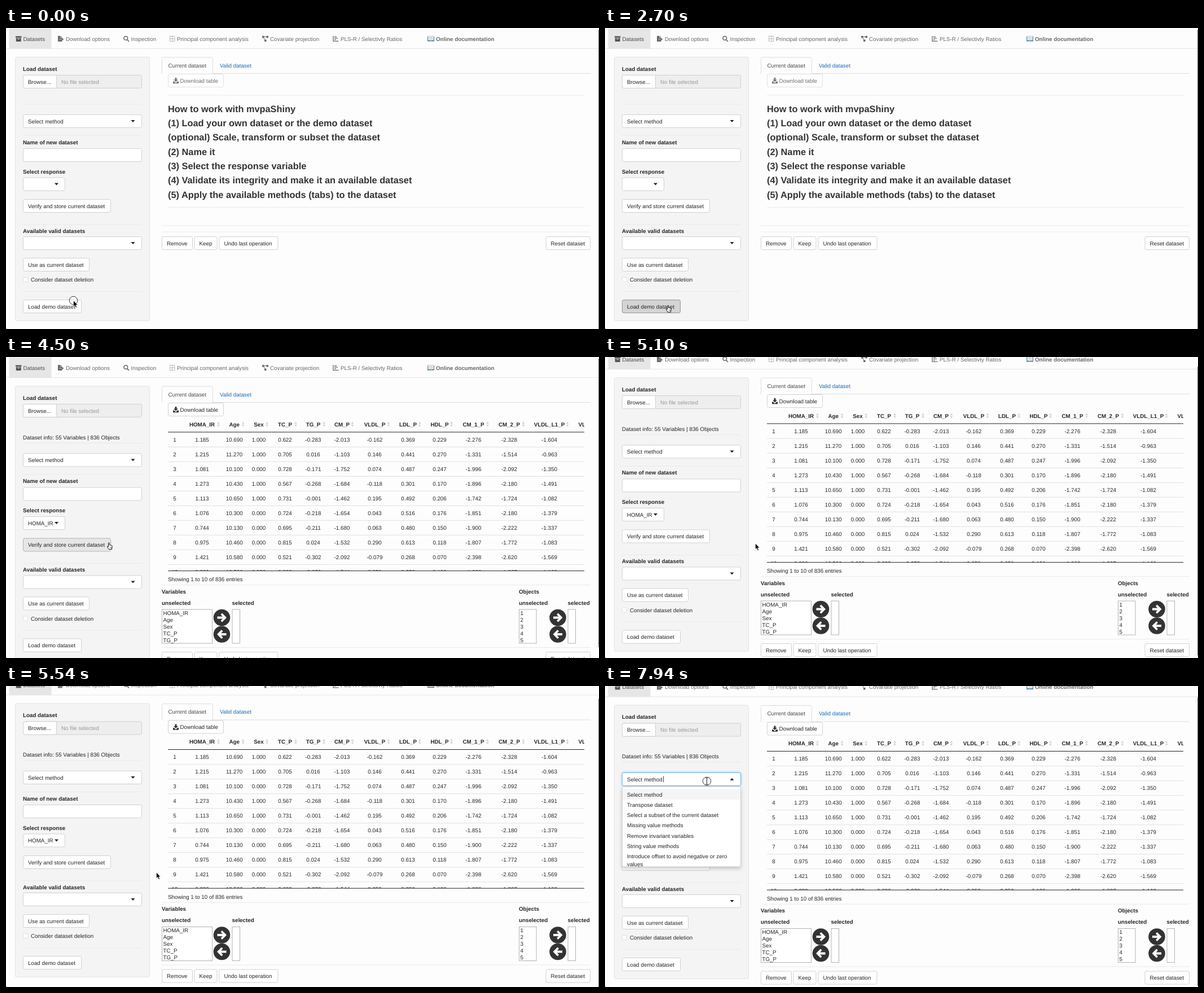
Write an HTML page that moves like this. It is 1051x533 px and loops after 8 s.

```html
<!DOCTYPE html>
<html lang="en">
<head>
<meta charset="utf-8">
<title>Dataset loading demo</title>
<style>
html, body { margin: 0; width: 100%; height: 100%; overflow: hidden; background: #fdfdfd; }
svg { display: block; width: 1051px; height: 533px; }
text { font: 9.8px "Liberation Sans", Arial, sans-serif; fill: #262626; text-rendering: geometricPrecision; white-space: pre; }
.b { font-weight: bold; }
.m { text-anchor: middle; }
.nav { fill: #686868; }
.h { font-size: 16.35px; font-weight: bold; fill: #333; }
</style>
</head>
<body>
<svg id="stage" viewBox="0 0 1051 533"></svg>
<script>
const LOOP = 8000;
const INFO_SHIFT = 17.5, FOOTER_SHIFT = 14;

// Markup helpers; text is placed by its vertical centre.
const text = (x, y, s, cls = '', attrs = '') => `<text x="${x}" y="${y + 3.5}" class="${cls}" ${attrs}>${s}</text>`;
const rect = (x, y, w, h, fill, stroke = 'none', attrs = '') =>
  `<rect x="${x}" y="${y}" width="${w}" height="${h}" fill="${fill}" stroke="${stroke}" stroke-width=".9" ${attrs}/>`;
const path = (d, fill = 'none', stroke = 'none', w = 1, attrs = '') =>
  `<path d="${d}" fill="${fill}" stroke="${stroke}" stroke-width="${w}" ${attrs}/>`;
const line = (x1, x2, y, color = '#eaeaea', w = 1) => path(`M${x1} ${y}H${x2}`, 'none', color, w);
const group = (id, ...parts) => `<g id="${id}">${parts.join('')}</g>`;
const box = (x, y, w, attrs = '') => rect(x + .5, y + .5, w - 1, 23, '#fff', '#ccc', `rx="2.8" ${attrs}`);
const button = (x, y, w, label, id = '') => box(x, y, w, id && `id="${id}"`) + text(x + 9, y + 12, label);
const caret = (x, y, up) => path(up ? `M${x - 3.5} ${y + 2}h7l-3.5 -4z` : `M${x - 3.5} ${y - 2}h7l-3.5 4z`, '#222');
const select = (y, w, label = '', caretX = 225) => box(30, y, w) + text(39, y + 12, label) + caret(caretX, y + 12);

function navbar() {
  const g = '#6c6c6c';
  return line(0, 1051, 36.5, '#e5e5e5') + rect(5.5, 1, 75, 35.5, '#e6e6e6') +
    path('M17 14.5h10.5v2.8h-10.5zM17.8 18h8.9v6h-8.9zM20.5 19v1h3.5v-1z', '#555', 'none', 1, 'fill-rule="evenodd"') +
    text(30.5, 19, 'Datasets', '', 'style="fill:#4c4c4c"') +
    path('M92 14h4.5v3h3v2h-4v2h4v3h-7.5zM97.3 14l2.3 2.3h-2.3zM99 17.5l3.5 2.5l-3.5 2.5v-1.7h-3v-1.6h3z', g) +
    text(106, 19, 'Download options', 'nav') +
    `<circle cx="212.3" cy="18" r="3.3" fill="none" stroke="${g}" stroke-width="1.5"/>` + path('M214.8 20.6L218 24', 'none', g, 1.8) +
    text(221.5, 19, 'Inspection', 'nav') +
    path('M290.5 14.5h8.5v9h-8.5zM294.75 14.5v9M290.5 19h8.5', 'none', '#999', .9, 'stroke-dasharray="1.4 .6"') +
    text(303, 19, 'Principal component analysis', 'nav') +
    path('M454 14h3.5v3.5h-3.5zM461.5 14h3.5v3.5h-3.5zM458 20.5h3.5v3.5h-3.5z', g) +
    path('M457 15.7h5M456.5 17l2.5 4', 'none', g) +
    text(468, 19, 'Covariate projection', 'nav') +
    path('M580 14v9.3h9.5M582 15.7h4M582 18.2h6M582 20.7h3', 'none', g, 1.3) +
    text(593, 19, 'PLS-R / Selectivty Ratios', 'nav') +
    path('M747 15h12v8.5h-12z', '#3e78a8') +
    path('M748 14.5q3 -1 5 .6q2 -1.6 5 -.6v7.5q-3 -1 -5 .6q-2 -1.6 -5 -.6z', '#f4f2ec', '#9aa', .5) +
    path('M753 15v7.5M749.3 17h2.5M749.3 19h2.5M754.3 17h2.5M754.3 19h2.5', 'none', '#aaa', .6) +
    text(762, 19, 'Online documentation', 'nav b');
}

function sidebar() {
  const rule = y => line(30, 241, y, '#e9e9e9');
  return rect(16.5, 51.5, 238, 467, '#f4f4f4', '#e1e1e1', 'rx="2.5" id="well"') +
    text(30, 72, 'Load dataset', 'b') +
    rect(30.5, 83.5, 210, 23, '#eee', '#ccc', 'rx="2.8"') +
    path('M89.5 83.5H33.3a2.8 2.8 0 0 0 -2.8 2.8v17.4a2.8 2.8 0 0 0 2.8 2.8H89.5z', '#fff', '#ccc', .9) +
    text(39, 95, 'Browse...') + text(98, 95, 'No file selected', '', 'style="fill:#999"') +
    group('info', text(30, 142, 'Dataset info: 55 Variables | 836 Objects')) +
    group('side',
      rule(135), select(153, 211, 'Select method'), rule(190.5),
      text(30, 202, 'Name of new dataset', 'b'), box(30, 213, 211),
      text(30, 254, 'Select response', 'b'), select(264.5, 75, '', 89.5), group('response', text(39, 276.5, 'HOMA_IR')),
      button(30, 303, 156, 'Verify and store current dataset', 'verify'), rule(348),
      text(30, 359, 'Available valid datasets', 'b'), select(369, 211),
      button(30, 407, 118, 'Use as current dataset'),
      rect(30.5, 441.5, 8, 8, '#fff', '#ddd', 'rx="1.5"'), text(44, 445.5, 'Consider dataset deletion'),
      rule(466.5), button(30, 481, 104, 'Load demo dataset', 'demo'));
}

function tabs() {
  return line(276, 1036, 80.5, '#ddd') +
    path('M276.5 81V54.5q0 -2.5 2.5 -2.5h85q2.5 0 2.5 2.5V81', '#fdfdfd', '#ddd') +
    text(287.5, 66, 'Current dataset', '', 'style="fill:#4c4c4c"') +
    text(379, 66, 'Valid dataset', '', 'style="fill:#1b6ab3"') +
    group('download', button(287, 81, 99, ''), text(308.5, 93, 'Download table'),
      path('M299.5 88h3v3.5h2.5l-4 4l-4 -4h2.5zM296 94.5h2l3 3l3 -3h2v3.8h-10z', '#333'));
}

const actions = y => button(276, y, 55, 'Remove') + button(333.5, y, 41, 'Keep') +
  button(377.5, y, 105, 'Undo last operation') + button(956.5, y, 79.5, 'Reset dataset');

const steps = ['How to work with mvpaShiny', '(1) Load your own dataset or the demo dataset',
  '(optional) Scale, transform or subset the dataset', '(2) Name it', '(3) Select the response variable',
  '(4) Validate its integrity and make it an available dataset', '(5) Apply the available methods (tabs) to the dataset'];

const intro = () => line(287, 1025, 119) + steps.map((s, i) => text(287, 145.3 + 25.3 * i, s, 'h')).join('') +
  line(287, 1025, 317.5) + line(276, 1036, 350) + line(276, 1036, 361) + actions(369);

// Column: name, centre, distance from centre to the sort mark.
const columns = [['HOMA_IR', 347.5, 29], ['Age', 404.7, 15.5], ['Sex', 448, 14.5], ['TC_P', 494.5, 19], ['TG_P', 544.5, 19],
  ['CM_P', 595.5, 18.5], ['VLDL_P', 653.5, 24.5], ['LDL_P', 712.5, 21], ['HDL_P', 768.5, 21], ['CM_1_P', 828.5, 25],
  ['CM_2_P', 892, 25], ['VLDL_L1_P', 963, 32]];

const data = `1.185 10.690 1.000 0.622 -0.283 -2.013 -0.162 0.369 0.229 -2.276 -2.328 -1.604
1.215 11.270 1.000 0.705 0.016 -1.103 0.146 0.441 0.270 -1.331 -1.514 -0.963
1.081 10.100 0.000 0.728 -0.171 -1.752 0.074 0.487 0.247 -1.996 -2.092 -1.350
1.273 10.430 1.000 0.567 -0.268 -1.684 -0.118 0.301 0.170 -1.896 -2.180 -1.491
1.113 10.650 1.000 0.731 -0.001 -1.462 0.195 0.492 0.206 -1.742 -1.724 -1.082
1.076 10.300 0.000 0.724 -0.218 -1.654 0.043 0.516 0.176 -1.851 -2.180 -1.379
0.744 10.130 0.000 0.695 -0.211 -1.680 0.063 0.480 0.150 -1.900 -2.222 -1.337
0.975 10.460 0.000 0.815 0.024 -1.532 0.290 0.613 0.118 -1.807 -1.772 -1.083
1.421 10.580 0.000 0.521 -0.302 -2.092 -0.079 0.268 0.070 -2.398 -2.620 -1.569
0.880 10.500 0.000 0.688 -0.270 -1.544 0.050 0.350 0.186 -1.886 -1.887 -1.160`.split('\n').map(r => r.split(' '));

const tableHead = () => columns.map(([name, x, d]) => text(x, 119, name, 'b m') +
  path(`M${x + d - 2.3} 118.3h4.6l-2.3 -4zM${x + d - 2.3} 119.7h4.6l-2.3 4z`, '#d2d2d2')).join('') +
  text(1014.5, 119, 'VL', 'b', 'clip-path="url(#tableClip)"') +
  line(287, 1025, 133, '#222') + line(287, 1025, 378.7, '#222');

const tableRows = () => '<g clip-path="url(#tableClip)">' + data.map((row, i) => {
  const y = 146.3 + 26 * i;
  return (i ? line(287, 1025, y - 13, '#ddd', .9) : '') + text(299, y, i + 1, 'm') +
    row.map((v, c) => text(columns[c][1], y, v, 'm')).join('');
}).join('') + '</g>' + text(287, 393.5, 'Showing 1 to 10 of 836 entries');

function picker(title, x, items, listW, arrowX, selectedX) {
  const disc = (y, dir) => `<g transform="translate(${arrowX} ${y}) scale(${dir} 1)"><circle r="14.8" fill="#333"/>` +
    path('M-8 -2.1H1.3L-2 -5.4L.6 -8L8.5 0L.6 8L-2 5.4L1.3 2.1H-8z', '#fff') + '</g>';
  const list = (lx, w) => rect(lx + .5, 433, w, 60, '#fff', '#aaa');
  return text(x, 401, title, 'b') + text(x, 421, 'unselected', 'b') + text(selectedX, 421, 'selected', 'b') +
    list(x, listW) + list(selectedX, 13.5) + items.map((s, i) => text(x + 2.5, 439 + 12 * i, s)).join('') +
    disc(447.5, 1) + disc(477, -1);
}

const footer = () => line(276, 1036, 389.7) +
  picker('Variables', 276, columns.slice(0, 5).map(c => c[0]), 89, 382.5, 400.5) +
  picker('Objects', 909, [1, 2, 3, 4, 5], 30.5, 978, 995.5) +
  line(276, 1036, 500.5) + actions(508);

const methods = ['Select method', 'Transpose dataset', 'Select a subset of the current dataset', 'Missing value methods',
  'Remove invariant variables', 'String value methods', 'Introduce offset to avoid negative or zero'];

const dropdown = () =>
  rect(30.5, 153.5, 210, 23, '#fff', '#66afe9', 'rx="2.8" style="filter:drop-shadow(0 0 2px #66afe9aa)"') +
  text(39, 165, 'Select method') + path('M103.7 159.5v11', 'none', '#222', .9) + caret(225, 165, true) +
  rect(30.5, 178.5, 210, 141.5, '#fff', '#ccc', 'rx="2.5" style="filter:drop-shadow(0 3px 3px #0003)"') +
  rect(31, 182.5, 209, 18.5, '#f5f5f5') +
  methods.map((s, i) => text(39, 192 + 18.25 * i, s)).join('') + text(39, 315.5, 'values');

// Pointer shapes, with the hot spot at the origin.
const pointers = () =>
  group('ring', '<circle r="7.2" fill="#fff4" stroke="#333" stroke-width="1"/>') +
  group('arrow', path('M0 0V10.8L2.4 8.6L4.1 12.5L6 11.7L4.3 7.9H7.5z', '#000', '#fff', .7)) +
  group('hand', path('M-1 .8q1 -1.2 1.8 0v3.4l3.6 .8q1.6 .4 1.4 2l-.7 3.5v1.5h-5.3l-2.8 -4.3q-.3 -1.3 .8 -1.2l1.2 1z', '#fff', '#111', 1) +
    path('M2.2 7.5v2.5M4 7.5v2.5', 'none', '#111', .6)) +
  group('beam', path('M-2 -6q2 0 2 1.5v9q0 1.5 -2 1.5M2 -6q-2 0 -2 1.5v9q0 1.5 2 1.5', 'none', '#222', .9));

stage.innerHTML = '<defs><clipPath id="tableClip"><rect x="287" y="100" width="738" height="278.5"/></clipPath></defs>' +
  rect(0, 0, 1051, 533, '#fdfdfd') +
  group('page', navbar(), sidebar(), tabs(), group('intro', intro()), group('head', tableHead()),
    group('rows', tableRows()), group('footer', footer())) +
  group('menu', dropdown()) + rect(1050, 3, 1, 530, '#666', 'none', 'id="thumb"') +
  path('M0 531q0 2 3 2H0z', '#444') + group('pointer', pointers());

const el = id => document.getElementById(id);
const show = (id, on) => el(id).setAttribute('display', on ? 'inline' : 'none');
const shift = (id, x, y) => el(id).setAttribute('transform', `translate(${x} ${y})`);
const at = (keys, t) => keys.findLast(k => k[0] <= t);
const paint = (id, [, fill, stroke]) => { el(id).setAttribute('fill', fill); el(id).setAttribute('stroke', stroke); };

const idle = ['#fff', '#ccc'], hover = ['#e6e6e6', '#adadad'];
const demoKeys = [[0, ...idle], [1350, '#f1f1f1', '#bbb'], [1500, ...hover], [2700, '#d4d4d4', '#8c8c8c'], [2850, ...hover], [3600, ...idle]];
const verifyKeys = [[0, ...idle], [3900, ...hover], [4650, ...idle]];
const scrollKeys = [[0, 0], [4800, 3], [4950, 9], [5100, 15], [5250, 19], [5390, 20], [5540, 20.5], [6890, 17.5]];
const pointerKeys = [
  [0, 119.5, 482.5, 'arrow'], [150, 118.5, 483, 'arrow'], [300, 116.5, 485.5, 'hand'], [450, 114.5, 488, 'hand'],
  [600, 112.5, 490, 'hand'], [750, 111.5, 491, 'hand'], [3600, 122, 466, 'arrow'], [3750, 150, 385, 'arrow'],
  [3900, 172, 329, 'hand'], [4500, 182.5, 328.5, 'hand'], [4650, 225, 329, 'arrow'], [4800, 266.5, 330, 'arrow'],
  [7190, 258, 314, 'arrow'], [7340, 234, 268, 'arrow'], [7490, 204, 212, 'arrow'], [7640, 185, 176, 'beam'], [7790, 180.5, 168.5, 'beam']];

function render(now) {
  const t = now % LOOP, loaded = t >= 3150, filled = t >= 3600;
  const scroll = at(scrollKeys, t)[1];
  shift('page', 0, -scroll);
  shift('side', 0, loaded ? INFO_SHIFT : 0);
  shift('footer', 0, filled ? FOOTER_SHIFT : 0);
  el('well').setAttribute('height', loaded ? 467 + INFO_SHIFT : 467);
  el('download').setAttribute('opacity', loaded ? 1 : .65);
  el('thumb').setAttribute('y', 3 + scroll * .95);
  el('thumb').setAttribute('height', loaded ? 511 : 530);
  show('intro', !loaded);
  show('info', loaded);
  show('footer', loaded);
  show('head', t >= 3300);
  show('rows', filled);
  show('response', filled);
  show('menu', t >= 7940);
  paint('demo', at(demoKeys, t));
  paint('verify', at(verifyKeys, t));
  const [, x, y, shape] = at(pointerKeys, t);
  shift('pointer', x, y);
  for (const id of ['arrow', 'hand', 'beam']) show(id, id === shape);
  show('ring', t < 150 || t >= 7790);
  requestAnimationFrame(render);
}
render(performance.now());
</script>
</body>
</html>
```
